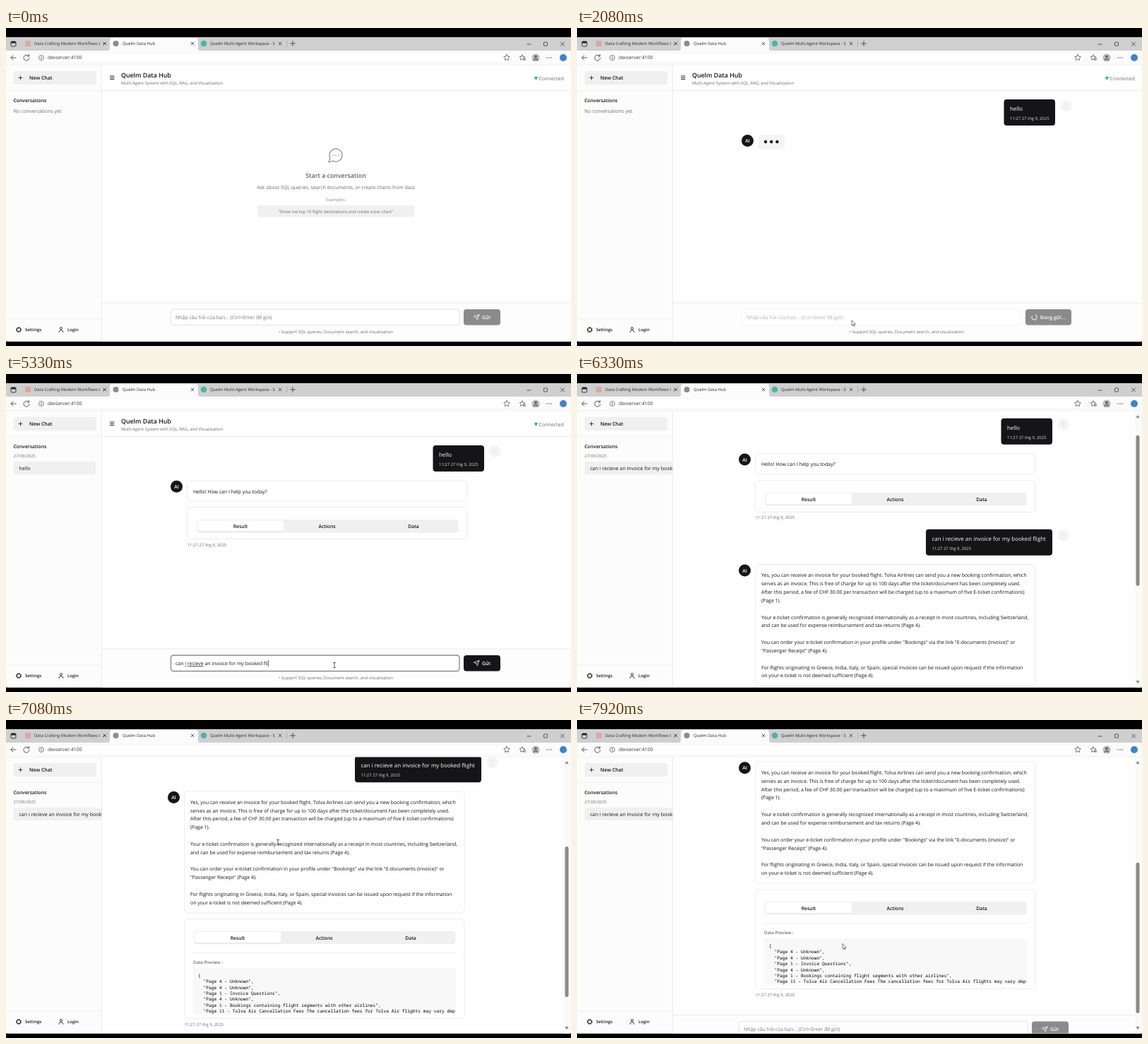
Recreate the animation shown at these times as an HTML page. Size 800 by 450 pixels, loop 8 s.

```html
<!DOCTYPE html>
<html lang="vi">
<head>
<meta charset="utf-8">
<title>Chat demo</title>
<style>
  html, body { margin: 0; width: 100%; height: 100%; overflow: hidden; background: #000; }
  svg { display: block; }
  text { font-family: 'Open Sans', 'Noto Sans', sans-serif; text-rendering: geometricPrecision; white-space: pre; }
  .mono { font-family: 'Noto Sans Mono', 'DejaVu Sans Mono', monospace; }
  .line { fill: none; stroke-linecap: round; stroke-linejoin: round; }
  .typo { text-decoration: underline; text-decoration-thickness: .5px; }
</style>
</head>
<body>
<script>
const LOOP = 8000;
const INK = '#151518', GRAY = '#6c6c74', PALE = '#f0f0f1', EDGE = '#e8e8ea', STRIP = '#cfcfd0';
const FIRST = 'hello', SECOND = 'can i recieve an invoice for my booked flight';
const STAMP = '11:27 27 thg 9, 2025';

// When things happen, in ms
const FOCUS_1 = 600, TYPE_1 = 750, SEND_1 = 1420, REPLY_1 = 2670;
const FOCUS_2 = 3000, TYPE_2 = 3200, SEND_2 = 5580, REPLY_2 = 6170, SCROLL = 6248;

// Drawing helpers; text is placed by the middle of its capitals
const text = (x, y, s, size = 6.95, fill = INK, extra = '') =>
  `<text x="${x}" y="${y + size * .36}" font-size="${size}" fill="${fill}" ${extra}>${s}</text>`;
const bold = (x, y, s, size, fill, extra = '') => text(x, y, s, size, fill, 'font-weight="600" ' + extra);
const middle = 'text-anchor="middle"';
const rect = (x, y, w, h, r, fill, stroke = 'none', extra = '') =>
  `<rect x="${x}" y="${y}" width="${w}" height="${h}" rx="${r}" fill="${fill}" stroke="${stroke}" ${extra}/>`;
const dot = (x, y, r, fill, extra = '') => `<circle cx="${x}" cy="${y}" r="${r}" fill="${fill}" ${extra}/>`;
const path = (d, stroke = '#333', width = .8, extra = '') =>
  `<path class="line" d="${d}" stroke="${stroke}" stroke-width="${width}" ${extra}/>`;
const group = (id, body) => `<g id="${id}">${body}</g>`;
const cross = (x, y, r) => path(`M${x - r} ${y - r}l${2 * r} ${2 * r}m0 ${-2 * r}l${-2 * r} ${2 * r}`);
const star = (x, y, r) => path('M' + Array.from({ length: 10 }, (_, i) => {
  const a = (i / 5 - .5) * Math.PI, d = i % 2 ? r * .5 : r;
  return `${x + d * Math.cos(a)} ${y + d * Math.sin(a)}`;
}).join('L') + 'Z', '#444', .7);

function browser() {
  const tab = (x, title, icon) => icon + text(x, 22, title, 5.9, '#2a2a2a');
  return rect(0, 13, 800, 430.5, 0, '#fdfdfd') +
    rect(0, 13, 800, 19, 0, STRIP) +
    path('M144 32q3 0 3-3v-11q0-4 4-4h117q4 0 4 4v11q0 3 3 3z', 'none', 0, 'style="fill:#fbfbfb"') +
    rect(0, 32, 800, 20, 0, '#fbfbfb') +
    rect(7, 19, 7, 7, 1.5, 'none', '#222', 'stroke-width=".9"') + rect(7, 19, 7, 2.5, 1, '#222') +
    tab(40, 'Data Crafting Modern Workflows Gu', rect(27, 18, 8, 8, 1, '#d8aaa2')) +
    tab(165, 'Quelm Data Hub', dot(155.5, 22, 4, '#8b8b8b')) +
    tab(289, 'Quelm Multi-Agent Workspace - S', dot(280, 22, 4.3, '#4bb5a5')) +
    rect(133, 15, 4, 15, 0, STRIP) + rect(382.5, 15, 3, 15, 0, STRIP) +
    [140, 264, 388].map(x => cross(x, 22, 2)).join('') +
    path('M397.5 18v8', '#999', .6) + path('M402.5 22h7m-3.5-3.5v7') +
    path('M738 23h5') + rect(761.5, 20, 5, 5, 1, 'none', '#333', 'stroke-width=".8"') + cross(788, 22.5, 2.5) +
    path('M14 42h-7m3-3l-3 3 3 3') + path('M32 39.5a4 4 0 1 0 1 3m-.5-5v2.5h-2.5') +
    rect(41, 35, 679, 14, 6, '#fff', '#eee', 'stroke-width=".6"') +
    dot(50, 42, 3.5, 'none', 'stroke="#444" stroke-width=".7"') + path('M50 41.5v2m0-3.3v.1') +
    text(59, 42, 'devserver:4100', 6.8, '#333') +
    star(709, 42, 4.5) + star(731, 42, 4) + path('M733 43h3m-3 2h3', '#444', .7) +
    dot(750, 42, 5.5, '#b9bbbd') + dot(750, 40.5, 2, '#666') + path('M747 45.5q3-3.5 6 0', '#666', 1.4) +
    [766, 769, 772].map(x => dot(x, 42, .7, '#333')).join('') + dot(789, 42, 5, '#3d83cf') +
    path('M0 52h800', '#e4e4e6', .6);
}

function sidebar() {
  return rect(2, 52.5, 133, 391, 0, '#fcfcfc') +
    rect(11, 61, 117, 19, 3, PALE) + path('M18 70.5h5m-2.5-2.5v5', INK) + bold(33, 70.5, 'New Chat', 7) +
    path('M2 88.5h133M2 412h133', '#ececee', .7) +
    bold(10.5, 102.5, 'Conversations', 6.8) +
    group('noChats', text(10.5, 117, 'No conversations yet', 6.95, GRAY)) +
    group('chats', text(10.5, 115.5, '27/09/2025', 5.95, GRAY) + rect(11, 124, 116, 18, 3, PALE, 'none', 'id="chatRow"') +
      text(18.5, 133.5, '', 7.05, INK, 'id="chatName"')) +
    dot(18, 427, 2.7, 'none', `stroke="${INK}" stroke-width="1"`) +
    dot(18, 427, 3.6, 'none', `stroke="${INK}" stroke-width="1" stroke-dasharray="1.41"`) +
    bold(27, 427, 'Settings', 6) +
    dot(78, 425, 1.6, 'none', `stroke="${INK}" stroke-width=".8"`) + path('M75 430.5q0-3 3-3t3 3', INK) +
    bold(87, 427, 'Login', 6);
}

const userMessage = (x, y, s) =>
  rect(x, y, 677 - x, 37, 4, INK) + text(x + 8.5, y + 13, s, 7.95, '#fff') +
  text(x + 8.5, y + 27, STAMP, 5.95, '#ddd') +
  dot(692.5, y + 8.5, 8.5, '#f5f5f6') + dot(692.5, y + 7, 1.7, 'none', 'stroke="#e4e4e6"') +
  path(`M689 ${y + 13}q3.5-5 7 0`, '#e4e4e6');

const avatar = y => dot(241.5, y, 8.5, INK) + bold(241.5, y, 'AI', 6.9, '#fff', middle);
const typingDots = y => avatar(y + 8.5) + rect(257, y, 37, 20.5, 4, '#f4f4f5') +
  [267, 275.2, 283.4].map(x => dot(x, y + 10, 2.2, INK)).join('');
const card = (y, h) => rect(256.7, y, 396.3, h, 5, '#fefefe', EDGE, 'stroke-width=".8"');
const tabs = y => rect(270, y, 370.5, 18.5, 4, PALE) +
  rect(271.2, y + 1.8, 122, 15.5, 3, '#dcdcde') + rect(271.2, y + 1.3, 122, 15.3, 3, '#fff') +
  ['Result', 'Actions', 'Data'].map((s, i) => bold(332 + i * 122.5, y + 9.5, s, 6.8, INK, middle)).join('');

const ANSWER = `Yes, you can receive an invoice for your booked flight. Tolva Airlines can send you a new booking confirmation, which
serves as an invoice. This is free of charge for up to 100 days after the ticket/document has been completely used.
After this period, a fee of CHF 30.00 per transaction will be charged (up to a maximum of five E-ticket confirmations)
(Page 1).

Your e-ticket confirmation is generally recognized internationally as a receipt in most countries, including Switzerland,
and can be used for expense reimbursement and tax returns (Page 4).

You can order your e-ticket confirmation in your profile under "Bookings" via the link "E-documents (Invoice)" or
"Passenger Receipt" (Page 4).

For flights originating in Greece, India, Italy, or Spain, special invoices can be issued upon request if the information
on your e-ticket is not deemed sufficient (Page 4).`.split('\n');

const PREVIEW = `[
  "Page 4 - Unknown",
  "Page 4 - Unknown",
  "Page 1 - Invoice Questions",
  "Page 4 - Unknown",
  "Page 1 - Bookings containing flight segments with other airlines",
  "Page 11 - Tolva Air Cancellation Fees The cancellation fees for Tolva Air flights may vary dep`.split('\n');

function conversation() {
  const reply1 = avatar(159.3) + card(151, 29) + text(265, 166, 'Hello! How can I help you today?') +
    card(188.7, 44.8) + tabs(206) + text(256.7, 241.5, STAMP, 5.95, GRAY);
  const reply2 = avatar(316.3) + card(307.7, 172) +
    ANSWER.map((s, i) => text(265, 323 + i * 11.85, s)).join('') +
    card(488.5, 140.5) + tabs(505.5) + path('M269 536.5h372', EDGE, .8) +
    bold(269, 549.5, 'Data Preview :', 6.05, GRAY) + rect(269, 557.5, 372, 65, 3, '#f8f8f9') +
    PREVIEW.map((s, i) => text(276, 568.5 + i * 8.35, s, 6.25, '#000', 'class="mono"')).join('') +
    text(256.7, 637.5, STAMP, 5.95, GRAY);
  return group('ask1', userMessage(604.5, 101, FIRST)) + group('wait1', typingDots(151)) + group('reply1', reply1) +
    group('ask2', userMessage(498, 258, SECOND)) + group('wait2', typingDots(307.7)) + group('reply2', reply2);
}

function mainPane() {
  const header = path('M147.5 68h5.5m-5.5 2.3h5.5m-5.5 2.3h5.5', INK, .9) +
    bold(163, 66.5, 'Quelm Data Hub', 8.8) +
    text(163, 78, 'Multi-Agent System with SQL, RAG, and Visualization', 5.95, GRAY) +
    path('M748 70q2.5-2.5 5 0l-2.5 3.5z', '#3fbf55', .4, 'style="fill:#3fbf55"') +
    text(754.5, 71, 'Connected', 7, GRAY) + path('M136 88.5h663', EDGE, .8);
  const empty = path('M7.9 20A9 9 0 1 0 4 16.1L2 22Z', '#8a8a90', 1.2, 'transform="translate(455 168)"') +
    [463, 467, 471].map(x => dot(x, 180.2, .8, '#8a8a90')).join('') +
    bold(467, 209, 'Start a conversation', 8.8, '#5f5f66', middle) +
    text(467, 225.5, 'Ask about SQL queries, search documents, or create charts from data', 6.95, GRAY, middle) +
    text(467, 243, 'Examples:', 5.95, '#8a8a90', middle) + rect(356, 251, 222, 16.5, 3, PALE) +
    text(467, 259.5, '"Show me top 10 flight destinations and create a bar chart"', 5.95, GRAY, middle);
  const footer = rect(136, 389, 663, 56, 0, '#fdfdfd') + path('M136 389h663', EDGE, .8) +
    rect(233.5, 398, 408.5, 22.5, 3.5, '#fff', '#ddd', 'id="field"') +
    text(240, 409.5, 'Nhập câu hỏi của bạn... (Ctrl+Enter để gửi)', 6.95, '#777', 'id="hint"') +
    text(240, 409.5, '', 6.95, INK, 'id="typed"') + rect(0, 405, .7, 9, 0, INK, 'none', 'id="caret"') +
    group('send', rect(648, 398, 52, 22.5, 4, INK, 'none', 'id="sendBox"') +
      path('M22 2 15 22 11 13 2 9ZM22 2 11 13', '#fff', 2, 'transform="translate(662 405) scale(.36)"') +
      bold(674, 409.5, 'Gửi', 6.9, '#fff')) +
    group('sending', rect(635, 398, 65, 22.5, 4, '#8b8b8d') +
      path('M647.5 405.8a3.5 3.5 0 1 1-3.5 3.5', '#fff', .9, 'id="spinner"') +
      bold(656, 409.5, 'Đang gửi...', 6.9, '#fff')) +
    text(467, 429.5, '• Support SQL queries, Document search, and visualization', 5.95, GRAY, middle);
  const scrollbar = rect(790, 52, 9, 392, 0, '#fafafa') +
    path('M792 61.5l2-3 2 3zM792 434.5l2 3 2-3z', '#777', .5, 'style="fill:#777"') +
    rect(791.5, 66, 5, 213, 2.5, '#8a8a8a', 'none', 'id="thumb"');
  return `<svg x="136" y="52.5" width="663" height="391" viewBox="136 52.5 663 391">` +
    rect(136, 52, 663, 393, 0, '#fefefe') +
    group('page', header + group('empty', empty) + conversation() + group('footer', footer)) +
    group('scrollbar', scrollbar) + '</svg>' + path('M135.5 52.5v391', EDGE, .8);
}

const cursors = group('arrow', path('M0 0v7l1.7-1.5 1.2 2.6 1-.5-1.2-2.4h2.3z', '#222', .6, 'style="fill:#fff"')) +
  group('beam', path('M-1.5-3.5h3m-1.5 0v7m-1.5 0h3', '#222', .7));

document.body.innerHTML = '<svg width="100%" height="100%" viewBox="0 0 800 450">' + rect(0, 0, 800, 450, 0, '#000') +
  browser() + sidebar() + mainPane() + group('cursor', cursors) + '</svg>';

const el = id => document.getElementById(id);
const show = (id, on) => el(id).style.display = on ? '' : 'none';
const set = (id, name, value) => el(id).setAttribute(name, value);
const within = (t, from, to) => t >= from && t < to;

// Pointer stops: time, x, y
const STOPS = [[250, 520, 330], [550, 389, 414], [2670, 389, 414], [2950, 465, 412], [6400, 465, 412],
  [6420, 385, 173], [7080, 385, 173], [7500, 385, 172], [7560, 385, 172], [7850, 376, 317], [8000, 376, 317]];

function pointerAt(t) {
  const next = STOPS.findIndex(stop => stop[0] > t);
  if (next < 1) return [STOPS[0][1], STOPS[0][2]];
  const [a, b] = [STOPS[next - 1], STOPS[next]];
  const u = (t - a[0]) / (b[0] - a[0]), ease = u * u * (3 - 2 * u);
  return [1, 2].map(i => a[i] + (b[i] - a[i]) * ease);
}

function typedAt(t) {
  if (t < SEND_1) return FIRST.slice(0, Math.max(0, (t - TYPE_1) / 100));
  return t < SEND_2 ? SECOND.slice(0, Math.max(0, (t - TYPE_2) / 50)) : '';
}

function draw(t) {
  const loading = within(t, SEND_1, REPLY_1) || within(t, SEND_2, REPLY_2);
  const focused = within(t, FOCUS_1, SEND_1) || within(t, FOCUS_2, SEND_2);
  const long = t >= REPLY_2;
  const typed = typedAt(t);

  show('empty', t < SEND_1);
  show('ask1', t >= SEND_1);
  show('wait1', within(t, SEND_1, REPLY_1));
  show('reply1', t >= REPLY_1);
  show('ask2', t >= SEND_2);
  show('wait2', within(t, SEND_2, REPLY_2));
  show('reply2', long);

  show('noChats', t < REPLY_1);
  show('chats', t >= REPLY_1);
  set('chatRow', 'width', long ? 125 : 116);
  el('chatName').textContent = long ? SECOND : FIRST;

  set('field', 'width', loading ? 395 : 408.5);
  set('field', 'stroke', focused ? '#8c8c90' : loading ? '#f1f1f2' : '#dcdcde');
  set('field', 'stroke-width', focused ? 1.4 : .8);
  show('hint', !typed);
  set('hint', 'fill', loading ? '#b0b0b3' : '#777');
  el('typed').innerHTML = typed.replace(/\b(i|recieve)\b/g, '<tspan class="typo">$1</tspan>');
  show('caret', focused);
  set('caret', 'x', 240.3 + (typed ? el('typed').getComputedTextLength() : 0));
  show('send', !loading);
  set('sendBox', 'fill', typed ? INK : '#8b8b8d');
  show('sending', loading);
  set('spinner', 'transform', `rotate(${t * .36} 647.5 409.3)`);

  const scroll = t < SCROLL ? 0 : 259 * (1 - Math.exp((SCROLL - t) / 520));
  set('page', 'transform', `translate(${long ? -4 : 0} ${-scroll})`);
  set('footer', 'transform', `translate(0 ${long ? 277 : 0})`);
  show('scrollbar', long);
  set('thumb', 'y', 66 + scroll * .546);

  const [x, y] = pointerAt(t);
  const beam = !loading && (within(t, 500, 6400) && y > 398 || within(t, 6400, 7600));
  show('cursor', t >= 250 && !within(t, SEND_2, 6420));
  set('cursor', 'transform', `translate(${x} ${y})`);
  show('beam', beam);
  show('arrow', !beam);
}

function frame(now) {
  draw(now % LOOP);
  requestAnimationFrame(frame);
}
draw(0);
requestAnimationFrame(frame);
</script>
</body>
</html>
```
